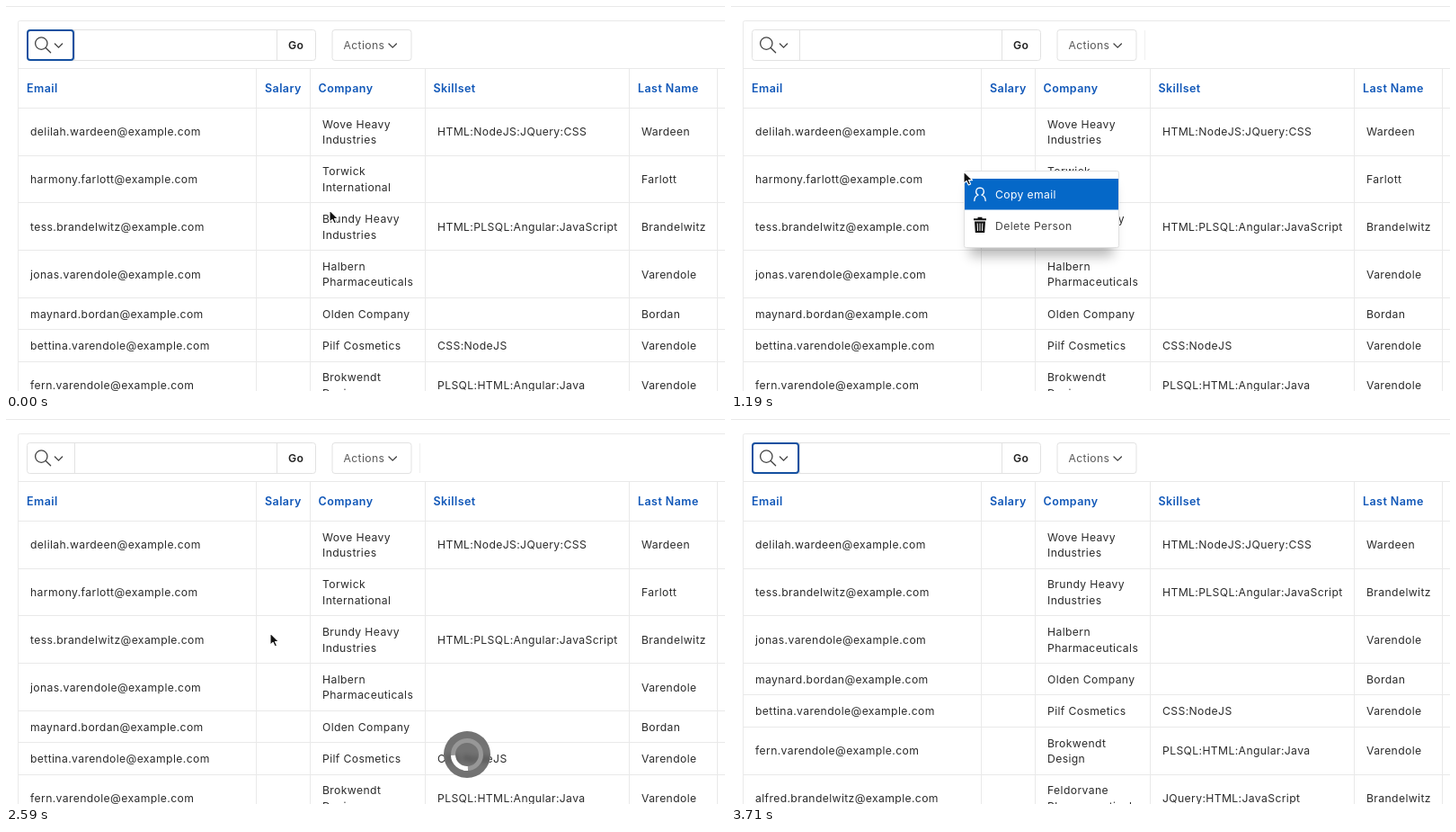
Recreate the animation shown at these times as an HTML page. Size 800x428 px, loop 3780 ms.

```html
<!DOCTYPE html>
<html lang="en">
<head>
<meta charset="utf-8">
<title>Report with context menu</title>
<style>
  html, body { margin: 0; width: 100%; height: 100%; overflow: hidden; background: #fff; }
  svg { display: block; width: 100%; height: 100%; }
  text { font: 12.2px Inter, "Open Sans", sans-serif; letter-spacing: .37px; fill: #2b2b2b; white-space: pre; }
  .head { font-size: 12.5px; font-weight: 600; letter-spacing: .43px; fill: #1057b8; }
  .go { font-weight: 600; fill: #222; }
  .soft { fill: #5a5a5a; }
  .rule { stroke: #e9e9e9; fill: none; }
  .box { stroke: #e2e2e2; fill: none; }
  .icon { stroke: #404040; fill: none; stroke-width: 1.3; stroke-linecap: round; stroke-linejoin: round; }
</style>
</head>
<body>
<svg viewBox="0 0 800 428" preserveAspectRatio="none">
  <defs>
    <filter id="blur"><feGaussianBlur stdDeviation="2.5"/></filter>
    <filter id="shade" x="-20%" y="-20%" width="140%" height="160%"><feGaussianBlur stdDeviation="7"/></filter>
    <clipPath id="disc"><circle cx="513" cy="373" r="26"/></clipPath>
  </defs>
  <rect width="800" height="428" fill="#fff"/>
  <path class="rule" d="M0 .5H800M800 16.5H15.5Q13.5 16.5 13.5 18.5V428M13.5 69.5H800"/>
  <path id="split" d="M460.5 27V60" stroke="#f0f0f0"/>

  <rect class="box" x="23.5" y="26.5" width="321" height="34" rx="3"/>
  <path class="box" d="M76.5 27V60M301.5 27V60"/>
  <rect class="box" x="363" y="26.5" width="88" height="34" rx="3"/>
  <g class="icon">
    <circle cx="39.3" cy="41.6" r="6.7"/>
    <path d="M44.2 46.5L49.6 51.8M54.4 42L58.5 46.1L62.6 42M426 42L430.2 46.1L434.4 42"/>
  </g>
  <text class="go" x="314" y="48">Go</text>
  <text class="soft" x="375.5" y="48">Actions</text>
  <rect id="ring" x="24" y="27" width="51" height="33" rx="3" fill="none" stroke="#1450a0" stroke-width="2"/>

  <g id="heads"></g>
  <g id="table"></g>

  <g id="menu">
    <rect x="266" y="200" width="159" height="78" fill="#000" opacity=".28" filter="url(#shade)"/>
    <rect x="259.5" y="183.5" width="172" height="85" rx="2" fill="#fff" stroke="#e0e0e0"/>
    <rect id="bar" x="260" y="192" width="171" height="34.5" fill="#0568c8"/>
    <g id="copy">
      <path class="icon" d="M270.8 216.5C271 212 273.3 210.6 275 210.1C271.3 208.2 272 202.4 277 202.2C282 202.4 282.7 208.2 279 210.1C280.7 210.6 283 212 283.2 216.5"/>
      <text x="294" y="214">Copy email</text>
    </g>
    <g id="del">
      <path class="can" d="M270 236.2H274.5V234.8H279.5V236.2H284V238.2H270ZM271 239.4H283L282.2 252H271.8Z"/>
      <path class="slit" d="M274.2 241.5L274.5 250M277 241.5V250M279.8 241.5L279.5 250" fill="none"/>
      <text x="294" y="248.6">Delete Person</text>
    </g>
  </g>

  <g id="spin">
    <g clip-path="url(#disc)">
      <rect x="486" y="346" width="54" height="54" fill="#fff"/>
      <use href="#table" filter="url(#blur)"/>
    </g>
    <circle cx="513" cy="373" r="26" fill="#444" opacity=".75"/>
    <circle cx="513" cy="373" r="15.5" fill="none" stroke="#979797" stroke-width="5"/>
    <path id="arc" d="M524 362A15.5 15.5 0 0 1 524 384" fill="none" stroke="#fff" stroke-width="5"/>
  </g>

  <g id="arrow">
    <path d="M0 0V13.2L3.1 10.4L5.3 15L7.6 14L5.5 9.6H9.6Z" fill="#111" stroke="#fff" stroke-width="1.1" stroke-linejoin="round"/>
  </g>
  <g id="hand">
    <path d="M1.1 1.3C1.1-.3 3.4-.3 3.5 1.3L4 5C4.6 4 6.2 4.2 6.4 5.3C7.1 4.5 8.5 4.8 8.7 5.9C9.6 5.3 10.8 5.9 10.8 7.2V10.5L9.5 14.4H3.5L-.9 8.9C-1.8 7.6-.3 6.5.8 7.4L2 8.4Z" fill="#fff" stroke="#222" stroke-linejoin="round"/>
    <path d="M4.5 9.5V12M6.5 9.5V12M8.4 9.5V12" stroke="#222" stroke-width=".7"/>
  </g>
</svg>
<script>
const LOOP = 3780, STEP = 70;
const HIT = { menu: 1120, hover: 1190, second: 1820, close: 2240, busy: 2380, refresh: 2800, idle: 3150, leave: 3500 };
const $ = id => document.getElementById(id);

// name, surname, company (two lines split by "|"), skills
const people = [
  ["delilah", "Wardeen", "Wove Heavy|Industries", "HTML:NodeJS:JQuery:CSS"],
  ["harmony", "Farlott", "Torwick|International", ""],
  ["tess", "Brandelwitz", "Brundy Heavy|Industries", "HTML:PLSQL:Angular:JavaScript"],
  ["jonas", "Varendole", "Halbern|Pharmaceuticals", ""],
  ["maynard", "Bordan", "Olden Company", ""],
  ["bettina", "Varendole", "Pilf Cosmetics", "CSS:NodeJS"],
  ["fern", "Varendole", "Brokwendt|Design", "PLSQL:HTML:Angular:Java"],
  ["alfred", "Brandelwitz", "Feldorvane|Pharmaceuticals", "JQuery:HTML:JavaScript"]
];

const label = (x, y, s, cls = "") => `<text class="${cls}" x="${x}" y="${y}">${s}</text>`;

function tableMarkup(rows) {
  let y = 113.3, out = "";
  for (const [first, last, company, skills] of rows) {
    const lines = company.split("|");
    const h = lines.length > 1 ? 52.75 : 35.4;
    const base = y + h / 2 + 4.6;
    out += label(27, base, `${first}.${last.toLowerCase()}@example.com`);
    lines.forEach((s, i) => out += label(352, base + (i - (lines.length - 1) / 2) * 17.5, s));
    out += label(480, base, skills) + label(707, base, last);
    y += h;
    out += `<path class="rule" d="M13.5 ${Math.floor(y) + .5}H800"/>`;
  }
  return out;
}

const before = tableMarkup(people);
const after = tableMarkup(people.filter((_, i) => i !== 1));

$("heads").innerHTML =
  [[23, "Email"], [288, "Salary"], [347.5, "Company"], [475.5, "Skillset"], [703, "Last Name"]]
    .map(([x, s]) => label(x, 96.2, s, "head")).join("") +
  `<path class="rule" d="M13.5 113.5H800M278.5 69V428M338.5 69V428M466.5 69V428M693.5 69V428M791.5 69V428"/>`;

// pointer path: time, x, y
const path = [
  [0, 360, 227], [560, 264, 187], [840, 259, 184], [1190, 259, 184],
  [1470, 282, 225], [1680, 282, 225], [1960, 294, 238], [LOOP, 294, 238]
];

function pointer(t) {
  const i = path.findIndex(p => t < p[0]);
  const [a, b] = [path[i - 1], path[i]];
  const u = (t - a[0]) / (b[0] - a[0]);
  const e = u * u * (3 - 2 * u);
  return [a[1] + (b[1] - a[1]) * e, a[2] + (b[2] - a[2]) * e];
}

const show = (id, on) => $(id).setAttribute("visibility", on ? "visible" : "hidden");
const within = (t, a, b) => t >= a && t < b;

function tint(id, on) {
  for (const el of $(id).children) {
    if (el.tagName === "text") el.style.fill = on ? "#fff" : "#454545";
    else if (el.classList.contains("can")) el.style.fill = on ? "#fff" : "#111";
    else if (el.classList.contains("slit")) el.style.stroke = on ? "#0568c8" : "#fff";
    else el.style.stroke = on ? "#fff" : "#404040";
  }
}

let current = "";
function draw(t) {
  const rows = t < HIT.refresh ? before : after;
  if (rows !== current) $("table").innerHTML = current = rows;

  show("ring", !within(t, HIT.menu, HIT.refresh));
  show("split", within(t, 630, HIT.refresh));

  const open = within(t, HIT.menu, HIT.close);
  const second = t >= HIT.second;
  $("menu").style.display = open ? "" : "none";
  $("bar").style.display = t >= HIT.hover ? "" : "none";
  $("bar").setAttribute("y", second ? 226.5 : 192);
  tint("copy", t >= HIT.hover && !second);
  tint("del", second);

  $("spin").style.display = within(t, HIT.busy, HIT.idle) ? "" : "none";
  $("arc").setAttribute("transform", `rotate(${315 + (t - 2870) / 550 * 360} 513 373)`);

  const hand = within(t, 1260, HIT.close);
  const [x, y] = pointer(t);
  show("hand", hand);
  show("arrow", !hand && t < HIT.leave);
  for (const id of ["hand", "arrow"]) $(id).setAttribute("transform", `translate(${x} ${y})`);
}

const start = performance.now();
function tick() {
  const t = (performance.now() - start) % LOOP;
  draw(Math.floor(t / STEP) * STEP);
  requestAnimationFrame(tick);
}
tick();
</script>
</body>
</html>
```
